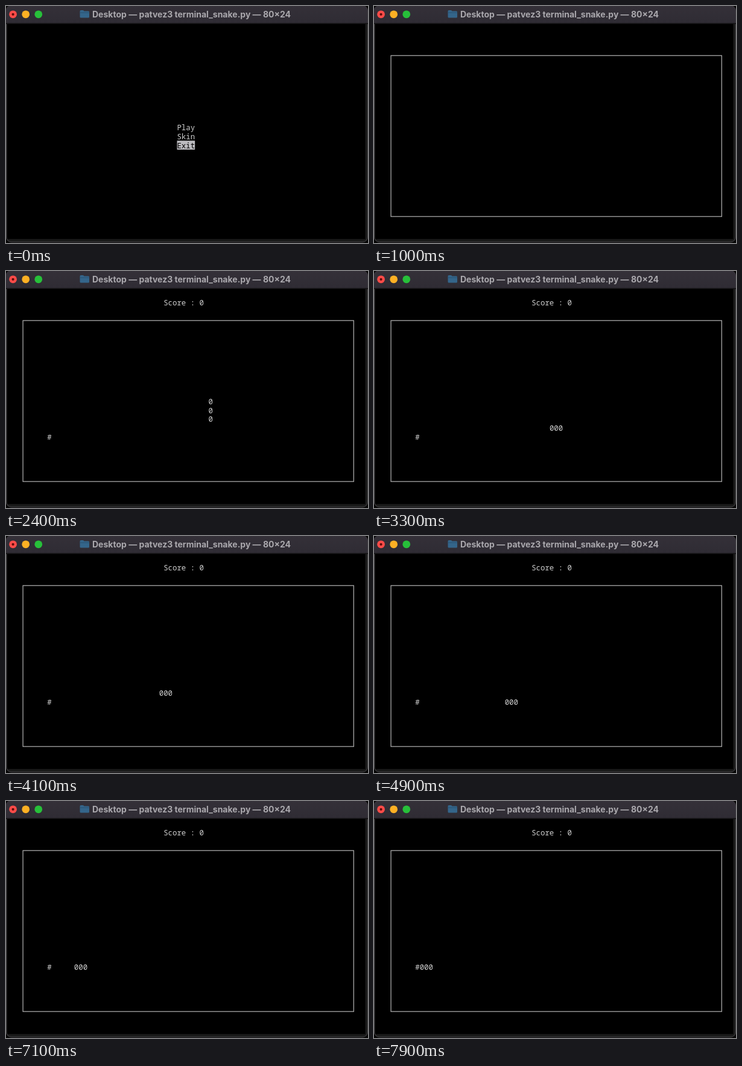
An HTML page that plays this animation: 600x393 px, repeating every 8000 ms.

```html
<!DOCTYPE html>
<html lang="en">
<head>
<meta charset="utf-8">
<title>Terminal game</title>
<style>
  html, body { margin: 0; width: 100%; height: 100%; overflow: hidden; background: #000; }
  svg { display: block; width: 600px; height: 393px; }
  .title { font: 700 14px Inter, sans-serif; fill: #aaa8ad; }
  .cells { font: 500 12.37px "Noto Sans Mono", monospace; fill: #cfcfcf; }
  .cells .on { fill: #000; }
  .frame { fill: none; stroke: #b0b0b0; stroke-width: 1.25; }
</style>
</head>
<body>
<svg viewBox="0 0 600 393">
  <defs>
    <linearGradient id="bar" x2="0" y2="1">
      <stop offset="0" stop-color="#343038"/>
      <stop offset="1" stop-color="#2f2c34"/>
    </linearGradient>
  </defs>

  <!-- window -->
  <rect width="600" height="393" fill="#050505"/>
  <rect x=".5" y="-.5" width="599" height="392" rx="8.5" fill="#1b1b1b" stroke="#48474a"/>
  <rect x="2" y="30" width="593.5" height="356.5" fill="#000"/>
  <path d="M0 28.5V7Q0 0 7 0H592Q599.5 0 599.5 8V28.5Z" fill="url(#bar)"/>
  <rect y="28.5" width="600" height="1.5" fill="#121113"/>

  <!-- title bar -->
  <circle cx="11.6" cy="13.8" r="6.4" fill="#fc4b48"/>
  <circle cx="11.6" cy="13.8" r="2.1" fill="#5c0d0b"/>
  <circle cx="32.7" cy="13.8" r="6.4" fill="#fdb024"/>
  <circle cx="53.8" cy="13.8" r="6.4" fill="#27c03a"/>
  <path d="M122.5 8.500q0-1.500 1.500-1.500h4l1.500 1.500h7q1.500 0 1.500 1.500v8q0 1.500-1.500 1.500h-12.500q-1.500 0-1.500-1.500z" fill="#34658a"/>
  <path d="M122.5 11h15.500" stroke="#285070"/>
  <text class="title" x="143" y="18.5">Desktop — patvez3 terminal_snake.py — 80×24</text>

  <g id="menu" class="cells"><rect id="bar-on" fill="#bcbbbf"/></g>
  <rect id="frame" class="frame" x="28.1" y="82.2" width="548.2" height="266.9"/>
  <g id="game" class="cells"></g>
</svg>

<script>
const LOOP = 8000, CELL_W = 7.42, CELL_H = 14.87;
const $ = id => document.getElementById(id);
const px = col => 1.5 + col * CELL_W;
const py = row => 30 + row * CELL_H;

function set(el, attrs) {
  for (const key in attrs) el.setAttribute(key, attrs[key]);
  return el;
}

function place(el, col, row) {
  return set(el, { x: px(col), y: py(row) + 12.2 });
}

function write(parent, text, col, row) {
  const el = document.createElementNS('http://www.w3.org/2000/svg', 'text');
  el.textContent = text;
  parent.append(el);
  return place(el, col, row);
}

const MENU_COL = 38, MENU_ROW = 11;
const items = ['Play', 'Skin', 'Exit'].map((text, i) => write($('menu'), text, MENU_COL, MENU_ROW + i));
set($('bar-on'), { x: px(MENU_COL), width: 4 * CELL_W, height: CELL_H });

write($('game'), 'Score : 0', 35, 1);
write($('game'), '#', 9, 16);
const body = [0, 1, 2].map(() => write($('game'), '0', 0, 0));

// Key presses shorten a tick, so the steps are listed in tenths of a second.
const ticks = [
  16, 18, 19, 21, 22, 24, 25, 27, 28, 29, 30, 31, 33, 34, 35, 36, 38, 40, 42, 44, 45, 46,
  48, 49, 51, 52, 54, 55, 57, 58, 60, 61, 63, 64, 66, 68, 69, 71, 72, 74, 75, 77, 78
];
const turns = 'RRRRDDLLLD' + 'L'.repeat(10) + 'D' + 'L'.repeat(22);
const step = { R: [1, 0], L: [-1, 0], D: [0, 1] };
const trail = [[39, 12], [40, 12], [41, 12]];
for (const turn of turns) {
  const [col, row] = trail[trail.length - 1];
  trail.push([col + step[turn][0], row + step[turn][1]]);
}

const show = (el, on) => { el.style.display = on ? '' : 'none'; };

function draw() {
  const t = performance.now() % LOOP;
  const picked = t < 100 ? 2 : t < 300 ? 1 : 0;
  show($('menu'), t < 1000);
  show($('frame'), t >= 1000);
  show($('game'), t >= 1500);

  items.forEach((el, i) => el.classList.toggle('on', i === picked));
  set($('bar-on'), { y: py(MENU_ROW + picked) });

  const moved = ticks.filter(tick => tick * 100 <= t).length;
  body.forEach((el, i) => place(el, ...trail[moved + i]));
  requestAnimationFrame(draw);
}
draw();
</script>
</body>
</html>
```
